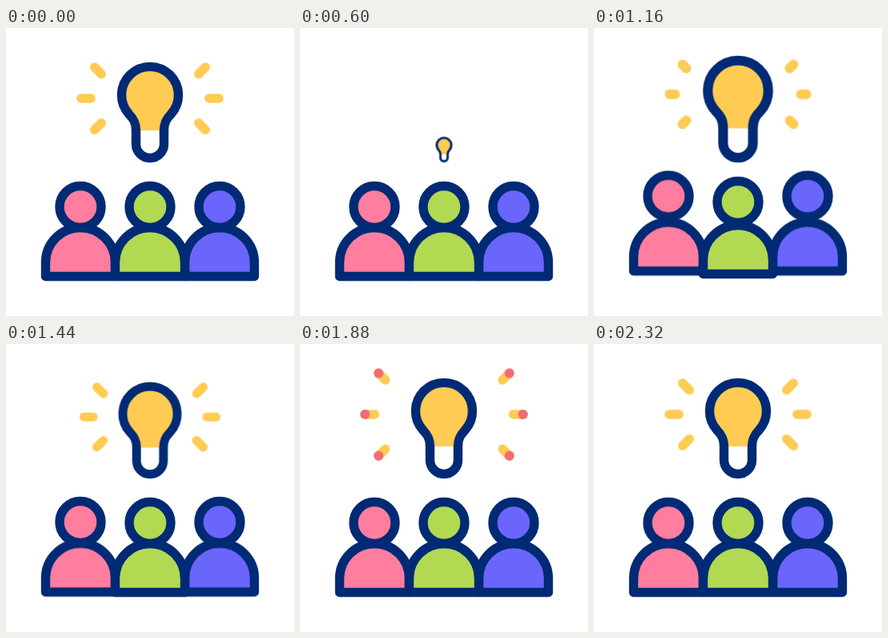
An HTML page without scripts that plays this animation: 360x360 px, repeating every 2.4 s.

```html
<!DOCTYPE html>
<html lang="en">
<head>
<meta charset="utf-8">
<title>Team idea</title>
<style>
  html, body { margin: 0; width: 100%; height: 100%; overflow: hidden; background: #fff; }
  svg { display: block; width: 100%; height: 100%; }

  .ink { stroke: #012a75; stroke-width: 11.4; stroke-linejoin: round; }
  .bar { stroke: #ffcb52; stroke-width: 11.6; stroke-linecap: round; stroke-dasharray: 1 2; }
  .tip { fill: #f26d73; }

  .bulb, .mid, .side, .shoot, .bar, .tip { animation: 2.4s ease-in-out infinite; }
  .bulb { animation-name: pop; transform-origin: 180px 168px; }
  .mid { animation-name: hop-mid; }
  .side { animation-name: hop-side; }
  .shoot { --far: 13.3px; animation-name: shoot; }
  .diag { --far: 18.6px; }
  .bar { animation-name: grow; }
  .tip { animation-name: tip; transform-origin: 6px 0; }

  @keyframes pop {
    0% { transform: scale(1); }
    8.333% { transform: scale(1); animation-timing-function: ease-in; }
    28.333%, 40% { transform: scale(0); animation-timing-function: ease-out; }
    48.333% { transform: scale(1.064); animation-timing-function: ease-out; }
    50.5% { transform: scale(1.085); }
    60% { transform: scale(.96); }
    67%, 100% { transform: scale(1); }
  }

  /* Heads sit in a nested hop, so they rise twice as far as the bodies. */
  @keyframes hop-mid {
    0%, 33.333% { transform: translateY(0); }
    41.667% { transform: translateY(-7px); }
    54.167%, 100% { transform: translateY(0); }
  }
  @keyframes hop-side {
    0%, 35% { transform: translateY(0); }
    45% { transform: translateY(-7.2px); }
    63.333%, 100% { transform: translateY(0); }
  }

  @keyframes grow {
    0%, 8.333% { stroke-dashoffset: 0; opacity: 1; }
    16.66% { stroke-dashoffset: 1; opacity: 1; }
    16.67%, 45% { stroke-dashoffset: 1; opacity: 0; }
    45.01% { stroke-dashoffset: 1; opacity: 1; }
    51.667%, 100% { stroke-dashoffset: 0; opacity: 1; }
  }
  @keyframes shoot {
    0%, 63.333% { transform: translateX(0); }
    75% { transform: translateX(var(--far)); }
    96.667%, 100% { transform: translateX(0); }
  }
  @keyframes tip {
    0%, 64% { transform: scale(0); }
    72%, 80% { transform: scale(1); }
    93%, 100% { transform: scale(0); }
  }
</style>
</head>
<body>
<svg viewBox="0 0 360 360">
  <defs>
    <path id="body" d="M-43.5 310.5V293a43.5 43.5 0 0 1 87 0V310.5Z"/>
    <circle id="head" cy="223.5" r="26"/>
  </defs>

  <g class="ink">
    <g transform="translate(93 0)" fill="#ff7d9f">
      <g class="side"><use href="#body"/><g class="side"><use href="#head"/></g></g>
    </g>
    <g transform="translate(267 0)" fill="#6a65fb">
      <g class="side"><use href="#body"/><g class="side"><use href="#head"/></g></g>
    </g>
    <g transform="translate(180 0)" fill="#b1d951">
      <g class="mid"><use href="#body"/><g class="mid"><use href="#head"/></g></g>
    </g>
  </g>

  <g class="bulb">
    <path fill="#ffcb52" d="M162.5 128C162.5 118 159 113 154 108A35.5 35.5 0 1 1 206 108C201 113 197.5 118 197.5 128Z"/>
    <path class="ink" fill="none" d="M162.5 145V128C162.5 118 159 113 154 108A35.5 35.5 0 1 1 206 108C201 113 197.5 118 197.5 128V145a17.5 17.5 0 0 1-35 0Z"/>

    <!-- Each ray points outward along its own x axis. -->
    <g transform="translate(100 88) rotate(180)"><g class="shoot">
      <path class="bar" pathLength="1" d="M-6 0H6"/><circle class="tip" cx="6" r="6.1"/>
    </g></g>
    <g transform="translate(260 88)"><g class="shoot">
      <path class="bar" pathLength="1" d="M-6 0H6"/><circle class="tip" cx="6" r="6.1"/>
    </g></g>
    <g transform="translate(115 53.3) rotate(225)"><g class="shoot diag">
      <path class="bar" pathLength="1" d="M-6 0H6"/><circle class="tip" cx="6" r="6.1"/>
    </g></g>
    <g transform="translate(245 53.3) rotate(-45)"><g class="shoot diag">
      <path class="bar" pathLength="1" d="M-6 0H6"/><circle class="tip" cx="6" r="6.1"/>
    </g></g>
    <g transform="translate(115 123) rotate(135)"><g class="shoot diag">
      <path class="bar" pathLength="1" d="M-6 0H6"/><circle class="tip" cx="6" r="6.1"/>
    </g></g>
    <g transform="translate(245 123) rotate(45)"><g class="shoot diag">
      <path class="bar" pathLength="1" d="M-6 0H6"/><circle class="tip" cx="6" r="6.1"/>
    </g></g>
  </g>
</svg>
</body>
</html>
```
